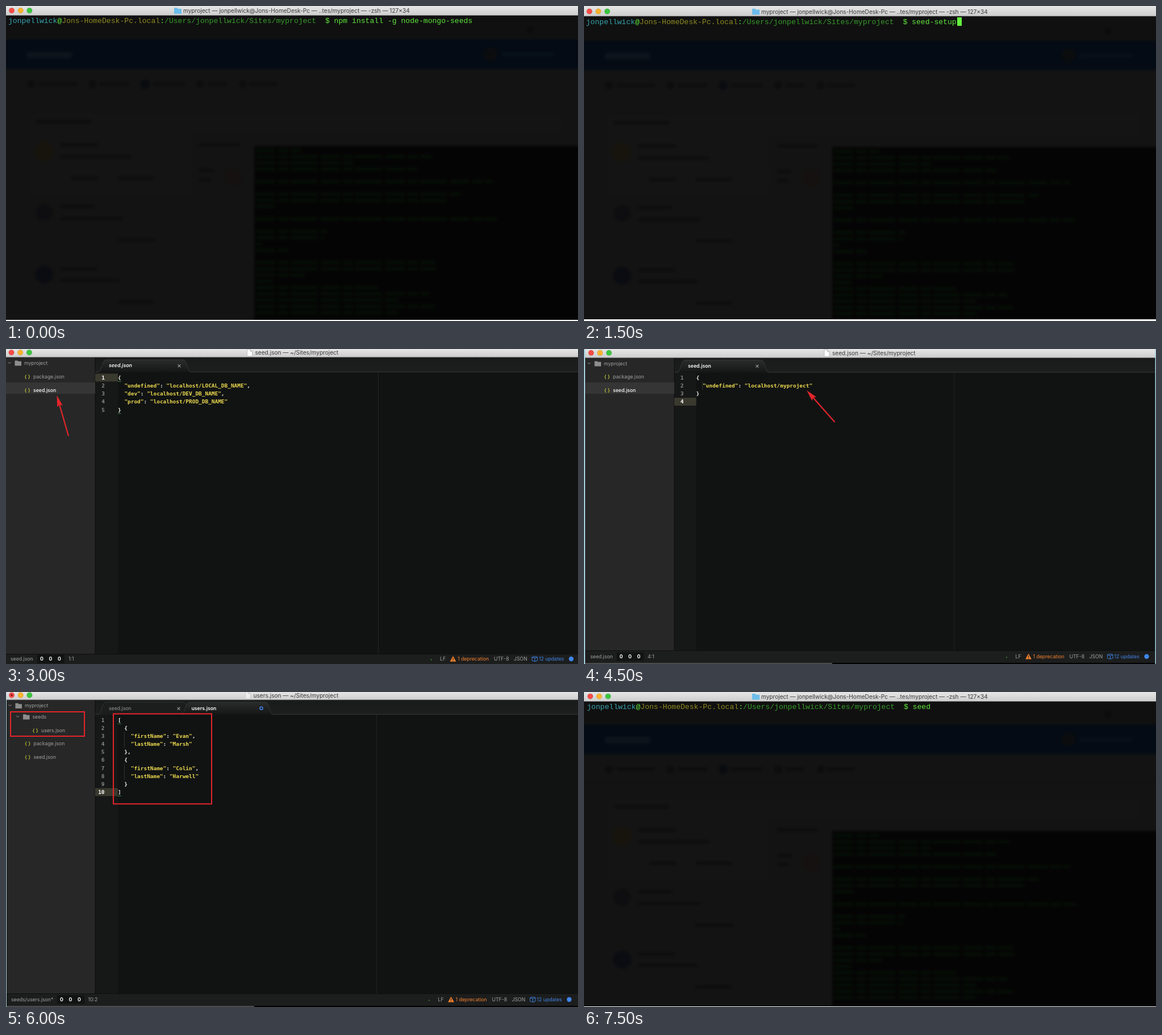
Animation of 1007 by 556 pixels, one loop 8 s. Source, as an HTML page:

```html
<!DOCTYPE html>
<html lang="en">
<head>
<meta charset="utf-8">
<title>Seeding a project</title>
<style>
  html, body { margin: 0; width: 100%; height: 100%; overflow: hidden; background: #000; }
  svg { display: block; width: 1007px; height: 556px; }
  text { white-space: pre; font-family: Inter, "Open Sans", sans-serif; font-size: 8.7px; }
  .title { font-size: 10.1px; fill: #3a3a3a; }
  .shell { font: 13.1px "Liberation Mono", "Noto Sans Mono", monospace; }
  .code { font: bold 9.45px "DejaVu Sans Mono", "Noto Sans Mono", monospace; }
</style>
</head>
<body>
<svg id="stage" viewBox="0 0 1007 556" xmlns="http://www.w3.org/2000/svg">
  <defs>
    <linearGradient id="bar" x2="0" y2="1">
      <stop offset="0" stop-color="#e6e6e6"/><stop offset="1" stop-color="#cdcdcd"/>
    </linearGradient>
    <linearGradient id="tabs" x2="0" y2="1">
      <stop offset="0" stop-color="#191a1a"/><stop offset="1" stop-color="#1d1e1e"/>
    </linearGradient>
    <linearGradient id="tab" x2="0" y2="1">
      <stop offset="0" stop-color="#2a2b2b"/><stop offset="1" stop-color="#151616"/>
    </linearGradient>
    <filter id="soft" filterUnits="userSpaceOnUse" x="0" y="0" width="1007" height="570"
      color-interpolation-filters="sRGB"><feGaussianBlur stdDeviation="2.4"/></filter>
  </defs>
</svg>
<script>
const USER = 'jonpellwick', HOST = 'Jons-HomeDesk-Pc';
const RED = '#e5252b', YELLOW = '#ecd94f', BLUE = '#3f86ea', ORANGE = '#f5822e';
const COL = 5.69, LINE = 14.17;

const rect = (x, y, w, h, fill, extra = '') =>
  `<rect x="${x}" y="${y}" width="${w}" height="${h}" fill="${fill}" ${extra}/>`;
const dot = (x, y, r, fill, extra = '') => `<circle cx="${x}" cy="${y}" r="${r}" fill="${fill}" ${extra}/>`;
const path = (d, stroke, width = 1, extra = 'fill="none"') =>
  `<path d="${d}" stroke="${stroke}" stroke-width="${width}" ${extra}/>`;
const text = (x, y, str, fill, extra = '') => `<text x="${x}" y="${y}" fill="${fill}" ${extra}>${str}</text>`;
const span = (str, fill) => `<tspan fill="${fill}">${str}</tspan>`;
const frame = (x, y, w, h) => rect(x, y, w, h, 'none', `stroke="${RED}" stroke-width="2"`);

function lights(x, y) {
  return ['#f84b46', '#fcb32c', '#3bc53e'].map((c, i) =>
    dot(x + i * 15.7, y, 4.8, c, 'stroke="#0003" stroke-width=".6"')).join('');
}

function folder(x, y, w, fill) {
  const h = w * .8;
  return `<path d="M${x} ${y - h / 2}h${w * .42}l${w * .1} ${h * .16}h${w * .48}v${h * .84}h${-w}z" fill="${fill}"/>`;
}

// Blurred desktop seen through the translucent terminal
function backdrop() {
  const bars = [
    [57, 125, 138], [165, 217, 138], [258, 315, 138], [355, 388, 138], [428, 477, 138],
    [53, 150, 204], [95, 162, 245], [95, 220, 266], [115, 162, 304], [197, 260, 304],
    [95, 155, 354], [95, 205, 375], [197, 262, 413], [95, 160, 464], [95, 200, 484],
    [197, 260, 522], [340, 412, 245], [340, 366, 290], [340, 360, 306]
  ];
  const output = [80, 310, 175, 285, 0, 415, 0, 360, 335, 35, 0, 425, 0, 125, 120, 10, 60,
    0, 315, 317, 85, 30, 215, 305, 250, 315, 250];
  let s = rect(-20, -20, 1047, 620, '#131313') + rect(-20, 18, 1047, 41, '#101010');
  s += rect(-20, 59, 1047, 52, '#040b14') + rect(37, 81, 79, 11, '#0d141c');
  s += dot(853, 85, 12, '#0b0c0e') + rect(872, 82, 94, 7, '#08101a') + dot(923, 42, 6, '#0b0b0b');
  s += rect(-20, 160, 1047, 1, '#101010');
  s += rect(43, 190, 935, 36, '#141414') + rect(43, 226, 282, 106, '#141414');
  s += bars.map(([a, b, y]) => rect(a, y - 3, b - a, 6, '#0d0d0d')).join('');
  s += [44, 152, 342, 417].map(x => dot(x, 138, 7, '#0d0d0d')).join('') + dot(245, 138, 8, '#090b10');
  s += dot(67, 256, 17, '#17140d') + dot(67, 364, 15, '#0e0e10') + dot(67, 474, 16, '#0b0c12');
  s += dot(400, 302, 16, '#151110') + rect(437, 247, 600, 340, '#040404');
  s += output.map((w, i) => path(`M440 ${255 + i * 11}h${w}`, '#061006', 5,
    'stroke-dasharray="34 5 18 4 47 6"')).join('');
  return `<g filter="url(#soft)">${s}</g>`;
}

function terminal({ x, y, titleY, barH, shift, bottom, command, cursor }) {
  const prompt = span(USER, '#37a3ad') + span('@', '#5fe63c') + span(HOST + '.local', '#8f8a22') +
    span(':', '#5fe63c') + span(`/Users/${USER}/Sites/myproject`, '#379b2b') + span('  $ ' + command, '#5fe63c');
  return rect(0, 0, 1007, 556, '#131313') +
    `<g transform="translate(0 ${shift})">${backdrop()}</g>` +
    rect(0, bottom, 1007, 556 - bottom, '#fff') +
    rect(0, 0, 1007, barH, 'url(#bar)') + rect(0, barH - .5, 1007, .7, '#8a8a8a') +
    lights(x + 6, titleY - .5) + folder(296, titleY, 13, '#6cbdec') +
    text(312, titleY + 3.6, `myproject — ${USER}@${HOST} — ..tes/myproject — -zsh — 127×34`, '#3a3a3a', 'class="title"') +
    text(x, y + 4.3, prompt, '#5fe63c', 'class="shell"') +
    (cursor ? rect(cursor, y - 8, 8, 15, '#63f53c') : '');
}

function arrow(x1, y1, x2, y2) {
  const len = Math.hypot(x2 - x1, y2 - y1), ux = (x1 - x2) / len, uy = (y1 - y2) / len;
  const at = (d, side) => `${x2 + ux * d - uy * side} ${y2 + uy * d + ux * side}`;
  return path(`M${x1} ${y1}L${at(14, 0)}`, RED, 2.2) +
    `<path d="M${x2} ${y2}L${at(20, 5)}L${at(17, 0)}L${at(20, -5)}z" fill="${RED}"/>`;
}

function treeRow({ kind, x, y, name, on }) {
  const fill = on ? '#fff' : '#a2a2a2';
  const label = text(x, y + 3.1, name, fill, on ? 'font-weight="500"' : '');
  if (kind === 'dir')
    return path(`M${x - 28.5} ${y - 2}l2.5 2.5l2.5 -2.5`, '#999') + folder(x - 16.5, y, 11.5, '#8d8d8d') + label;
  return text(x - 15.5, y + 3, '{ }', '#b9bd35', 'font-weight="600"') + label;
}

function tabShape(x, right, top, base, fill) {
  return path(`M${x} ${base}C${x + 7} ${base} ${x + 6} ${top} ${x + 14} ${top}H${right - 14}` +
    `C${right - 6} ${top} ${right - 8} ${base} ${right} ${base}`, '#3a3b3b', .8, `fill="${fill}"`);
}

function cross(x, y) {
  return path(`M${x - 2.4} ${y - 2.4}l4.8 4.8m0 -4.8l-4.8 4.8`, '#9a9a9a', 1.2);
}

function codeLine(x, y, str) {
  const parts = str.split(/("[^"]*")/).map(p => span(p, p[0] === '"' ? YELLOW : '#f4f4f0'));
  return text(x, y + 3.4, parts.join(''), '#fff', 'class="code"');
}

function statusBar({ y, file, counts, pos, where, right, left }) {
  const mid = y + 3.1, at = x => x + right, grey = '#a2a2a2';
  const tri = at(787);
  return text(left + 8, mid, file, grey) +
    rect(counts - 8, y - 7.5, 48, 15, '#121313') +
    [0, 15.5, 31].map(d => text(counts + d, mid, '0', '#fff', 'font-weight="700" text-anchor="middle"')).join('') +
    text(where, mid, pos, grey) +
    dot(at(748.5), y + 1.5, .9, '#4fa83d') + text(at(764), mid, 'LF', grey) +
    `<path d="M${tri} ${y - 5}l5.4 9.8h-10.8z" fill="${ORANGE}"/>` +
    path(`M${tri} ${y - 1.6}v3.2m0 1v1.2`, '#1c1c1c', 1.2) +
    text(at(795), mid, '1 deprecation', ORANGE) + text(at(859), mid, 'UTF-8', grey) +
    text(at(894), mid, 'JSON', grey) +
    path(`M${at(926)} ${y - 3}l5 -1.4l4.6 1.4v6l-4.6 1.6l-5 -1.6zl5 1.4l4.6 -1.4m-4.6 1.4v6.2`, BLUE, .9) +
    text(at(938), mid, '12 updates', BLUE) + dot(at(995), y, 4.2, BLUE);
}

function editor(o) {
  const { left, side, barH, base, foot, gutter, lineY, active, lines } = o;
  const rowY = n => lineY + (n - 1) * LINE;
  let s = rect(0, 0, 1007, 556, '#111313') + rect(0, barH, side, foot - barH, '#272727');
  s += rect(side, barH, 1007 - side, base - barH, 'url(#tabs)') + rect(side, base, gutter - side, foot - base, '#161717');
  s += rect(side - .5, barH, 1, foot - barH, '#0c0c0c') + rect(o.guide, base, 1, foot - base, '#222424');
  s += path(`M${side} ${base - .5}H1007`, '#3a3b3b', .8);

  s += o.tabs.map(t =>
    tabShape(t.x, t.right, o.tabTop, base, t.on ? 'url(#tab)' : '#1c1d1d') +
    (t.on ? rect(t.x + 3, base - .9, t.right - t.x - 6, 1.2, '#141515') : '') +
    text(t.label, o.tabY + 3.1, t.name, t.on ? '#fff' : '#9b9b9b',
      (t.on ? 'font-weight="600"' : '') + (t.italic ? ' font-style="italic"' : '')) +
    (t.dirty ? dot(t.close, o.tabY, 2.5, 'none', `stroke="${BLUE}" stroke-width="1.5"`) : cross(t.close, o.tabY + .5))
  ).join('');

  s += rect(side, rowY(active) - 7, gutter - side, 14, '#3a392e');
  lines.forEach((str, i) => {
    const n = i + 1, y = rowY(n);
    s += text(o.numX, y + 3.4, n, n === active ? '#fff' : '#8b8c88', 'class="code" text-anchor="end"');
    s += codeLine(gutter, y, str);
  });
  s += o.pairs.map(n => rect(gutter, rowY(n) + 6.3, 5.7, 1, '#3f8f45')).join('');
  s += o.indents.map(([c, from, to]) =>
    rect(gutter + c * COL - .5, rowY(from) - 7, .8, (to - from + 1) * LINE, '#3a3b39')).join('');

  if (o.selected) s += rect(left, o.selected - 10, side - left, 20, '#353535');
  s += o.tree.map(treeRow).join('');

  s += rect(0, foot, 1007, 556 - foot, '#1c1d1d') + rect(0, foot, 1007, .8, '#0b0b0b');
  s += statusBar({ left, ...o.status });
  if (o.edge) s += rect(0, 554, 437, 2, '#4c4c4c') + rect(437, 554, 570, 2, '#000');
  s += rect(0, 0, 1007, barH, 'url(#bar)') + rect(0, barH - .6, 1007, .8, '#777');
  s += lights(o.lightX, o.titleY - .5) + (o.unsaved ? dot(o.lightX, o.titleY - .5, 1.6, '#6d0d0b') : '');
  const px = o.titleX - 14, py = o.titleY - 6;
  s += path(`M${px} ${py}h5.5l3.5 3.5v8.5h-9zm5.5 0v3.5h3.5`, '#aaa', .7, `fill="#fff" opacity="${o.unsaved ? .5 : 1}"`);
  s += text(o.titleX, o.titleY + 3.6, o.title + ' — ~/Sites/myproject', '#3a3a3a', 'class="title"');
  if (left) s += rect(0, 0, left, 556, '#a5cfdd');
  if (left > 1) s += rect(1005.5, 0, 1.5, 556, '#a5cfdd');
  return s + o.marks;
}

const file = (x, y, name, on) => ({ kind: 'file', x, y, name, on });
const dir = (x, y, name) => ({ kind: 'dir', x, y, name });

const scenes = [
  [0, terminal({ x: 4, y: 26, titleY: 8.5, barH: 16.5, shift: 0, bottom: 554,
    command: 'npm install -g node-mongo-seeds' })],

  [1500, terminal({ x: 3.5, y: 28, titleY: 10, barH: 18, shift: 2, bottom: 553,
    command: 'seed-setup', cursor: 657 })],

  [3000, editor({
    left: 0, side: 157, barH: 14.5, base: 41, foot: 538, gutter: 197, guide: 655,
    titleX: 438.5, titleY: 6.7, title: 'seed.json', lightX: 9.5,
    tabTop: 19, tabY: 29.3,
    tabs: [{ x: 162, right: 326, label: 181, name: 'seed.json', on: true, italic: true, close: 305 }],
    lineY: 50.5, numX: 174, active: 1, pairs: [1, 5], indents: [],
    lines: ['{', '  "undefined": "localhost/LOCAL_DB_NAME",', '  "dev": "localhost/DEV_DB_NAME",',
      '  "prod": "localhost/PROD_DB_NAME"', '}'],
    selected: 69,
    tree: [dir(32, 25, 'myproject'), file(48, 49, 'package.json'), file(48, 72.5, 'seed.json', true)],
    status: { y: 547, file: 'seed.json', counts: 63, pos: '1:1', where: 110, right: 0 },
    marks: arrow(110, 153.5, 89.5, 82)
  })],

  [4500, editor({
    left: 2, side: 159, barH: 15.5, base: 41.5, foot: 532, gutter: 197.5, guide: 651.5, edge: true,
    titleX: 437, titleY: 7.3, title: 'seed.json', lightX: 12.5,
    tabTop: 19.5, tabY: 29.8,
    tabs: [{ x: 164, right: 326, label: 183, name: 'seed.json', on: true, close: 305 }],
    lineY: 50.5, numX: 175.5, active: 4, pairs: [], indents: [[2, 2, 2]],
    lines: ['{', '  "undefined": "localhost/myproject"', '}', ''],
    selected: 69,
    tree: [dir(35, 26, 'myproject'), file(51, 49.3, 'package.json'), file(51, 72.7, 'seed.json', true)],
    status: { y: 542.7, file: 'seed.json', counts: 65.5, pos: '4:1', where: 112, right: -4.5, left: 3 },
    marks: arrow(441.5, 129, 392, 73)
  })],

  [6000, editor({
    left: 1, side: 157, barH: 14, base: 40, foot: 532, gutter: 197, guide: 652, edge: true,
    titleX: 435.5, titleY: 6, title: 'users.json', lightX: 10, unsaved: true,
    tabTop: 18, tabY: 28.7,
    tabs: [
      { x: 162, right: 326, label: 181, name: 'seed.json', close: 304 },
      { x: 309, right: 471, label: 326.5, name: 'users.json', on: true, dirty: true, close: 449.5 }
    ],
    lineY: 49.2, numX: 173.5, active: 10, pairs: [1, 10], indents: [[2, 3, 4], [2, 7, 8]],
    lines: ['[', '  {', '    "firstName": "Evan",', '    "lastName": "Marsh"', '  },',
      '  {', '    "firstName": "Colin",', '    "lastName": "Harwell"', '  }', ']'],
    tree: [dir(33, 24.3, 'myproject'), dir(46.5, 44, 'seeds'), file(62, 67.7, 'users.json'),
      file(48.5, 91.2, 'package.json'), file(48.5, 114.7, 'seed.json')],
    status: { y: 542.7, file: 'seeds/users.json*', counts: 98, pos: '10:2', where: 144.5, right: -3.5 },
    marks: frame(8, 35, 130, 43) + frame(189, 38.5, 173, 159)
  })],

  [7500, terminal({ x: 5, y: 26, titleY: 8.2, barH: 16.5, shift: -1.5, bottom: 555, command: 'seed' })]
];

const LOOP = 8000;
const stage = document.getElementById('stage');
const layers = scenes.map(([, body]) => {
  const g = document.createElementNS(stage.namespaceURI, 'g');
  g.innerHTML = body;
  g.style.display = 'none';
  return stage.appendChild(g);
});

let shown = -1;
function draw() {
  const t = performance.now() % LOOP;
  const now = scenes.filter(([start]) => start <= t).length - 1;
  if (now !== shown) {
    layers.forEach((g, i) => { g.style.display = i === now ? '' : 'none'; });
    shown = now;
  }
  requestAnimationFrame(draw);
}
draw();
</script>
</body>
</html>
```
